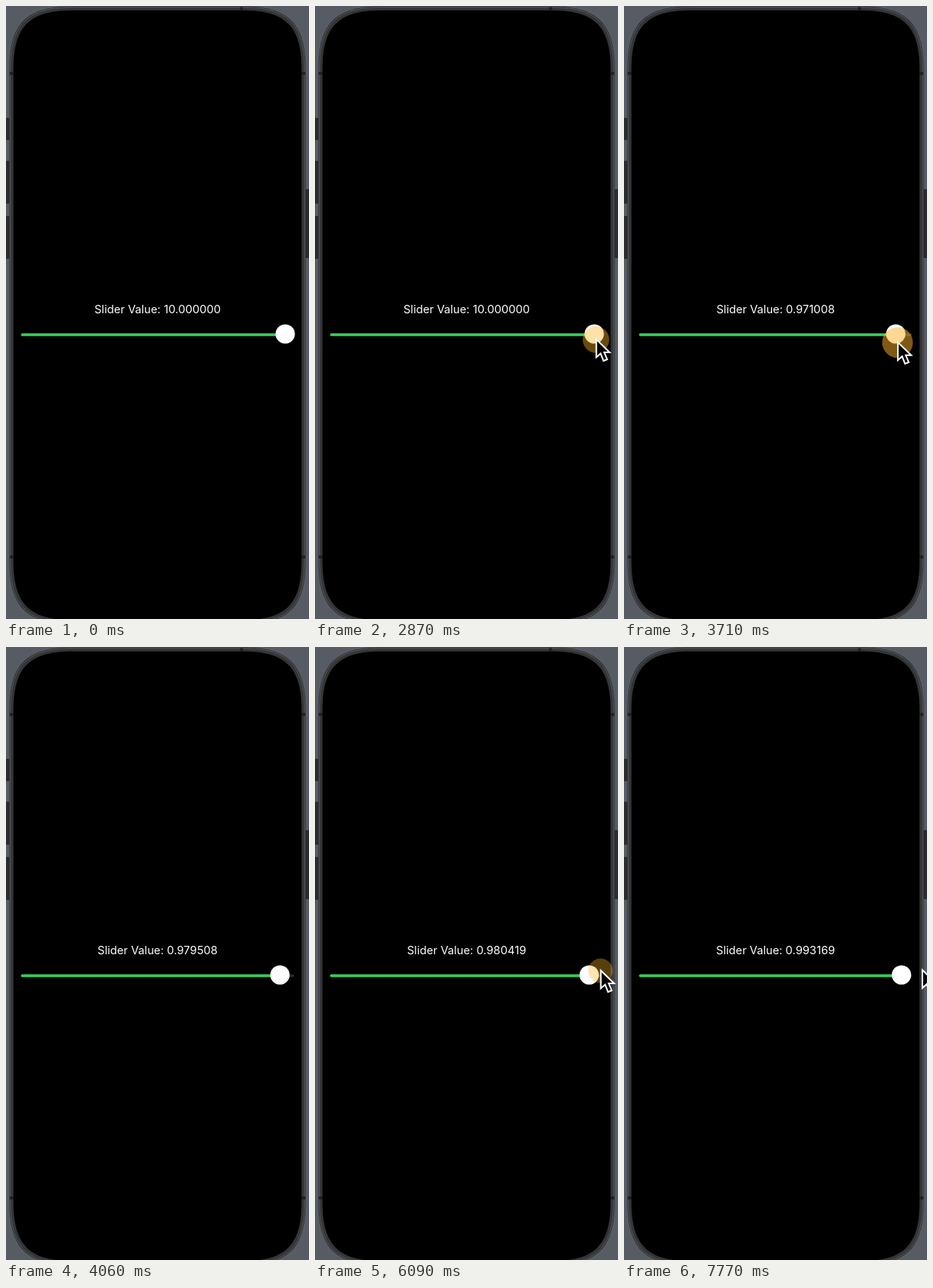
An HTML page that plays this animation: 395x800 px, repeating every 8000 ms.

```html
<!DOCTYPE html>
<html lang="en">
<head>
<meta charset="utf-8">
<title>Slider</title>
<style>
  html, body { margin: 0; width: 100%; height: 100%; overflow: hidden; background: #575c64; }
  svg { display: block; width: 395px; height: 800px; }
  text { font: 14.7px Inter, Roboto, sans-serif; fill: #fff; text-anchor: middle; }
</style>
</head>
<body>
<svg viewBox="0 0 395 800">
  <rect width="395" height="800" fill="#575c64"/>
  <g fill="#2b2c2e">
    <rect x="-3" y="146" width="7.5" height="29" rx="1"/>
    <rect x="-3" y="202" width="7.5" height="56" rx="1"/>
    <rect x="-3" y="274" width="7.5" height="56" rx="1"/>
    <rect x="390.5" y="239" width="8" height="90" rx="1"/>
  </g>
  <path id="edge" fill="#232426"/>
  <path id="bezel" fill="#343536" stroke="#66686a" stroke-width=".8"/>
  <g fill="#202122">
    <rect x="5" y="86" width="5" height="4"/>
    <rect x="385" y="86" width="5" height="4"/>
    <rect x="5" y="717" width="5" height="4"/>
    <rect x="385" y="717" width="5" height="4"/>
    <rect x="305" y="1.5" width="4" height="4"/>
  </g>
  <path id="screen"/>

  <text id="label" x="197.6" y="401.3"></text>
  <rect x="19.5" y="427.2" width="356" height="3.6" rx="1.8" fill="#2b2b2d"/>
  <rect id="fill" x="19.5" y="427.2" height="3.6" rx="1.8" fill="#34d158"/>
  <circle id="knob" cy="428" r="12.6" fill="#fff"/>
  <g id="pointer">
    <circle id="halo" cx=".8" cy="2.9" fill="#ffb228"/>
    <path d="M1.2 2.6V26L6.8 21 10.6 30.6 15.4 28.6 11.5 19.5H18.6Z" stroke="#fff" stroke-width="2"/>
  </g>
</svg>
<script>
const LOOP = 8000, STEP = 70, FADE = 210;
const TRAVEL = 335, GRAB = 365.5, OUT = 397;
const $ = id => document.getElementById(id);
const label = $('label'), fill = $('fill'), knob = $('knob'), pointer = $('pointer'), halo = $('halo');

// rounded body with continuous corners, inset from the phone's outer edge
function body(id, inset) {
  const l = 4.5 + inset, t = 0.5 + inset, r = 390.5 - inset, b = 806.5 - inset;
  const e = 82 - inset, k = e * .27;
  $(id).setAttribute('d', `M${l} ${t + e}C${l} ${t + k} ${l + k} ${t} ${l + e} ${t}
    H${r - e}C${r - k} ${t} ${r} ${t + k} ${r} ${t + e}
    V${b - e}C${r} ${b - k} ${r - k} ${b} ${r - e} ${b}
    H${l + e}C${l + k} ${b} ${l} ${b - k} ${l} ${b - e}Z`);
}
body('edge', 0);
body('bezel', 1.2);
body('screen', 5.2);

const clamp = v => Math.min(1, Math.max(0, v));
const ramp = (t, from, to) => clamp((t - from) / (to - from));
const ease = p => p * p * (3 - 2 * p);
const xFor = value => GRAB - TRAVEL * (1 - value);

// pointer stops: time, x, y
const stops = [
  [0, OUT, 445], [2100, OUT, 445], [2170, 380, 444.5],
  [2800, GRAB, 432.5], [2940, GRAB, 432.5],
  [3360, xFor(.864754), 427.5], [3780, xFor(.979508), 437], [3920, xFor(.979508), 437],
  [4060, OUT, 440], [5040, OUT, 421], [5460, 286, 418],
  [5950, 371.4, 419.6], [6580, 371.4, 419.6],
  [7210, 383.5, 419], [7490, 383.5, 419], [7770, 387.8, 419]
];

function pointerAt(t) {
  const i = stops.findIndex(s => s[0] > t);
  if (i < 0) return stops[stops.length - 1];
  const a = stops[i - 1], b = stops[i];
  const p = ease(ramp(t, a[0], b[0]));
  return a.map((v, n) => v + (b[n] - v) * p);
}

function valueAt(t, x) {
  if (t < 3920) return clamp(1 - (GRAB - x) / TRAVEL);
  return .979508 + .000911 * ramp(t, 6020, 6090) + .01275 * ease(ramp(t, 6580, 7070));
}

const press = (t, down, up) => ramp(t, down, down + FADE) - ramp(t, up, up + FADE);

function draw(now) {
  const t = Math.floor((now % LOOP) / STEP) * STEP;
  const [, x, y] = pointerAt(t);
  const value = valueAt(t, x);
  const cx = 364 - TRAVEL * (1 - value);
  const held = press(t, 2730, 3850) + press(t, 5985, 7490);
  label.textContent = 'Slider Value: ' + (t < 3010 ? 10 : value).toFixed(6);
  fill.setAttribute('width', cx - 19.5);
  knob.setAttribute('cx', cx);
  pointer.setAttribute('transform', `translate(${x} ${y})`);
  halo.setAttribute('r', 12 + 8 * held);
  halo.setAttribute('opacity', Math.sqrt(clamp(held)) / 2);
}

const start = performance.now();
function tick() {
  draw(performance.now() - start);
  requestAnimationFrame(tick);
}
tick();
</script>
</body>
</html>
```
